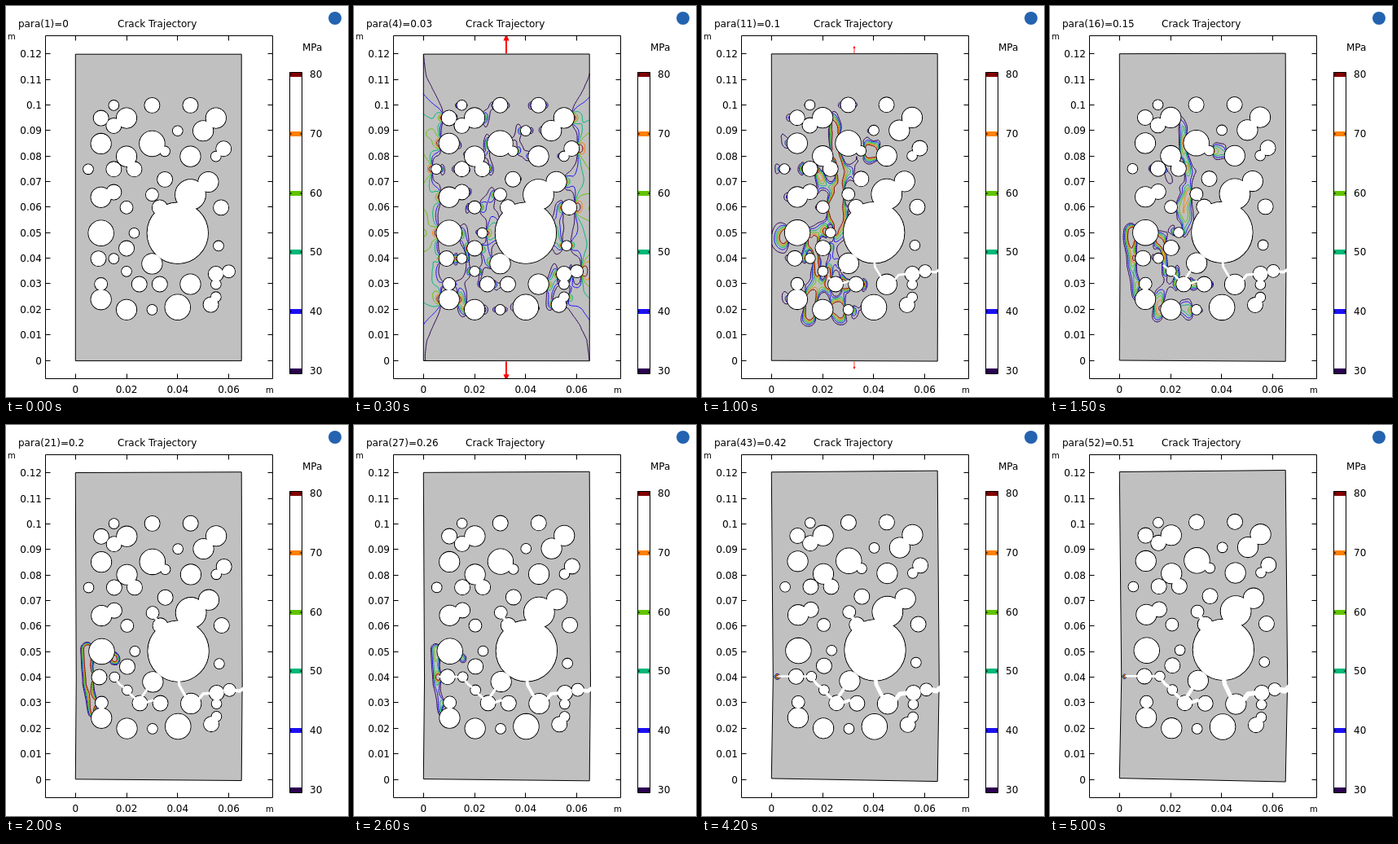
An HTML page that plays this animation: 420x480 px, repeating every 5.1 s.

```html
<!DOCTYPE html>
<html lang="en">
<head>
<meta charset="utf-8">
<title>Crack Trajectory</title>
<style>
html, body { margin: 0; width: 100%; height: 100%; overflow: hidden; background: #fff; }
svg { display: block; width: 420px; height: 480px; }
text { font: 12px "DejaVu Sans", sans-serif; fill: #000; }
.unit { font-size: 10px; }
</style>
</head>
<body>
<svg id="stage" viewBox="0 0 420 480" xmlns="http://www.w3.org/2000/svg"></svg>
<script>
const NS = 'http://www.w3.org/2000/svg';
const stage = document.getElementById('stage');
const STEP_MS = 100, STEPS = 51;
const LEFT = 85.3, RIGHT = 289.2, TOP = 59.2, BOTTOM = 435.6, SCALE = 3.137;
const WIDTH = RIGHT - LEFT, HEIGHT = BOTTOM - TOP;
const levels = [30, 40, 50, 60, 70, 80];
const colors = ['#2c0052', '#1c10f4', '#00b878', '#62c400', '#ff8000', '#840000'];

function add(tag, attrs, parent = stage) {
  const el = document.createElementNS(NS, tag);
  for (const k in attrs) el.setAttribute(k, attrs[k]);
  parent.appendChild(el);
  return el;
}
function label(x, y, str, anchor = 'start', cls = '') {
  const el = add('text', { x, y, 'text-anchor': anchor, class: cls });
  el.textContent = str;
  return el;
}
const clamp = (v, a, b) => Math.min(b, Math.max(a, v));
const ramp = (v, a, b) => clamp((v - a) / (b - a), 0, 1);
const points = str => str.split(' ').map(s => s.split(',').map(Number));

// Hole centres in mm, grouped by radius.
const pores = {
  2: '15,100 40,90 55,80 35,82 5,75 23,50 15,40 20,35 55,30 55,25 30,20 56,45',
  2.5: '30,65 20,60 60,35 10,30',
  3: '10,95 15,92 30,100 45,100 58,83 15,75 23,75 35,71 33,60 57,60 15,66 20,44 9,40 25,30 33,30 55,34 53,22',
  4: '20,95 50,90 55,95 45,80 10,85 20,80 52,70 10,64 30,38 45,30 20,20 10,24',
  5: '30,85 10,50 40,21',
  6: '45,65',
  12: '40,50'
};
const holes = Object.keys(pores).flatMap(r => points(pores[r]).map(([x, y]) =>
  ({ x: LEFT + x * SCALE, y: BOTTOM - y * SCALE, r: r * SCALE })));

// Both halves turn as rigid bodies about the crack line.
const crackY = x => 310 + 17 * ramp(x, 132, 160);
function warp(x, y, open, upper = clamp((crackY(x) - y) / 13 + .5, 0, 1)) {
  const u = (x - LEFT) / WIDTH, lower = 1 - upper;
  const dx = upper * 2.4 * (y - TOP) / 250 + lower * 2.5 * (BOTTOM - y) / 125;
  const dy = upper * (-1.7 - 2 * u) + lower * (-2 + 4.4 * u);
  return [x + open * dx, y + open * dy];
}

// Stress field on a regular grid.
const CELL = 1.5;
const cols = Math.floor(WIDTH / CELL) + 1, rows = Math.floor(HEIGHT / CELL) + 1;
const gx = i => LEFT + i * WIDTH / (cols - 1);
const gy = j => TOP + j * HEIGHT / (rows - 1);

// Kirsch solution for vertical tension, multiplied over all holes.
function concentration(x, y) {
  let k = 1;
  for (const h of holes) {
    const dx = x - h.x, dy = y - h.y, d = dx * dx + dy * dy + 1e-6;
    const q = Math.min(1, h.r * h.r / d);
    if (q < .004) continue;
    const c2 = 2 * dy * dy / d - 1, c4 = 2 * c2 * c2 - 1;
    k *= clamp(1 - q * (1.5 * c2 + c4) + 1.5 * q * q * c4, .02, 3);
  }
  return k;
}

// Bell-shaped ridge along polylines.
function ridge(chains, size, x, y) {
  let best = Infinity;
  for (const pts of chains) {
    for (let i = 1; i < pts.length; i++) {
      const [ax, ay] = pts[i - 1], bx = pts[i][0] - ax, by = pts[i][1] - ay;
      const t = clamp(((x - ax) * bx + (y - ay) * by) / (bx * bx + by * by), 0, 1);
      best = Math.min(best, (x - ax - t * bx) ** 2 + (y - ay - t * by) ** 2);
    }
  }
  return Math.exp(-best / (2 * size * size));
}
const ligament = [
  '164,152 172,205 163,260 138,298 150,335 130,380',
  '172,205 214,174', '166,224 130,200', '150,335 196,341', '105,285 138,298', '150,335 174,378'
].map(points);
const remnant = ['100,276 102,318 109,352', '101,292 130,288'].map(points);

const bulk = [], middle = [], late = [];
for (let j = 0; j < rows; j++) {
  for (let i = 0; i < cols; i++) {
    const x = gx(i), y = gy(j), k = concentration(x, y);
    const u2 = ((x - LEFT) / WIDTH * 2 - 1) ** 2;
    const inner = ramp(Math.min(j, rows - j) / rows, .07, .2);
    const soft = clamp(k, .35, 1.6);
    bulk.push((12 + 50 * u2 + 34 * inner * (1 - .5 * u2)) * k);
    middle.push(72 * ridge(ligament, 8, x, y) * soft + 17 * (1 - ramp(x, 190, 245)) * k);
    late.push(86 * ridge(remnant, 5.2, x, y) * soft);
  }
}

function field(p) {
  const a = Math.min(p / .06, 1) * (1 - ramp(p, .06, .1));
  const b = ramp(p, .06, .1) * (1 - ramp(p, .1, .2));
  const c = ramp(p, .1, .2) * (1 - ramp(p, .2, .32));
  const peak = 130 * ramp(p, .22, .33), size = 2.5 - ramp(p, .33, .51);
  const tip = tipX(p) - 1;
  return bulk.map((v, n) => {
    let s = a * v + b * middle[n] + c * late[n];
    const dx = gx(n % cols) - tip, dy = gy(Math.floor(n / cols)) - 310.5;
    if (peak && Math.abs(dx) < 9 && Math.abs(dy) < 9) {
      s += peak * Math.exp(-(dx * dx + dy * dy) / (2 * size * size));
    }
    return s;
  });
}
const tipX = p => 106 - 13 * ramp(p, .24, .33) - 3 * ramp(p, .33, .51);

// Marching squares; one path string per level.
function contours(f, open) {
  const out = levels.map(() => '');
  for (let j = 0; j < rows - 1; j++) {
    for (let i = 0; i < cols - 1; i++) {
      const n = j * cols + i;
      const v = [f[n], f[n + 1], f[n + cols + 1], f[n + cols]];
      const hi = Math.max(...v), lo = Math.min(...v);
      if (hi < levels[0] || lo >= 80) continue;
      const x = [gx(i), gx(i + 1), gx(i + 1), gx(i)];
      const y = [gy(j), gy(j), gy(j + 1), gy(j + 1)];
      levels.forEach((lv, m) => {
        if (lo >= lv || hi < lv) return;
        const pts = [];
        for (let e = 0; e < 4; e++) {
          const g = (e + 1) % 4;
          if ((v[e] >= lv) === (v[g] >= lv)) continue;
          const t = (lv - v[e]) / (v[g] - v[e]);
          const q = warp(x[e] + t * (x[g] - x[e]), y[e] + t * (y[g] - y[e]), open);
          pts.push(q.map(c => c.toFixed(1)).join(' '));
        }
        for (let e = 0; e + 1 < pts.length; e += 2) out[m] += 'M' + pts[e] + 'L' + pts[e + 1];
      });
    }
  }
  return out;
}

// Moving parts.
const clip = add('clipPath', { id: 'plot' }, add('defs', {}));
add('rect', { x: 49, y: 37, width: 278, height: 420 }, clip);
const plot = add('g', { 'clip-path': 'url(#plot)' });
const block = add('path', { fill: '#c0c0c0' }, plot);
const lines = colors.map(c => add('path', { fill: 'none', stroke: c }, plot));
const edge = add('path', { fill: 'none', stroke: '#000' }, plot);
const rims = holes.map(h => add('circle', { r: h.r, fill: '#fff', stroke: '#000', 'stroke-width': 1.1 }, plot));
const voids = holes.map(h => add('circle', { r: h.r - .5, fill: '#fff' }, plot));

// Crack branches: start, end, points.
const cracks = [
  [.07, .09, '211,313 212,321 221,335'],
  [.07, .09, '236,336 241,330 252,329'],
  [.05, .08, '279,326 286,327 293,323'],
  [.08, .12, '161,339 149,328'],
  [.08, .11, '171,341 179,338 185,340'],
  [.09, .13, '173,324 166,334'],
  [.12, .17, '146,324 139,319 134,313'],
  [.12, .2, '182,237 186,242'],
  [.21, .26, '129,310 119,310']
].map(([from, to, str]) => ({ from, to, pts: points(str), el: crackPath() }));
const lastCrack = crackPath();
function crackPath() {
  return add('path', { fill: 'none', stroke: '#fff', pathLength: 1, 'stroke-linejoin': 'round' }, plot);
}
const arrows = add('path', { fill: '#f00' }, plot);

function arrow(y, dir, len) {
  const w = Math.min(3.8, len * .085) / 2, head = len * .35, tip = y + dir * len, neck = tip - dir * head;
  return `M${187 - w} ${y}V${neck}H${187 - w * 3.5}L187 ${tip}L${187 + w * 3.5} ${neck}H${187 + w}V${y}Z`;
}

// Axes, title and legend.
let ticks = 'M48.5 36.5H327.5V457.5H48.5Z';
for (let i = 0; i <= 12; i++) {
  const y = Math.round(BOTTOM - i * 10 * SCALE);
  ticks += `M48.5 ${y - .5}h6M327.5 ${y - .5}h-6`;
  label(44, y + 4, String(i / 100), 'end');
}
for (let i = 0; i <= 3; i++) {
  const x = LEFT + i * 20 * SCALE, px = Math.floor(x) + .5;
  ticks += `M${px} 457.5v-6M${px} 36.5v6`;
  label(x, 475, String(i * 2 / 100), 'middle');
}
add('path', { d: ticks, fill: 'none', stroke: '#000' });
const para = label(15, 25.5, '');
label(137, 25.5, 'Crack Trajectory');
label(2, 41, 'm', 'start', 'unit');
label(319, 475, 'm', 'start', 'unit');
label(364, 55, 'MPa');
let marks = 'M348.5 81.5H363.5V451.5H348.5Z';
levels.forEach((lv, i) => {
  const y = Math.round(448 - i * 72.8);
  add('rect', { x: 348, y: y - 3, width: 16, height: 6, fill: colors[i] });
  marks += `M348 ${y}h3M364 ${y}h-3`;
  label(373, y + 4, String(lv));
});
add('path', { d: marks, fill: 'none', stroke: '#000' });
add('circle', { cx: 404, cy: 15, r: 8, fill: '#2463b0' });

function draw(step) {
  const n = step < 50 ? step : 51;
  const p = n / 100, open = p / .51;
  para.textContent = `para(${n + 1})=${p}`;

  const at = (x, y, side) => warp(x, y, open, side).join(' ');
  const upper = [[RIGHT, 325], [RIGHT, TOP], [LEFT, TOP], [LEFT, 310]].map(([x, y]) => at(x, y, 1));
  const lower = [[LEFT, 310], [LEFT, BOTTOM], [RIGHT, BOTTOM], [RIGHT, 325]].map(([x, y]) => at(x, y, 0));
  const outline = 'M' + [...upper, ...lower].join('L');
  block.setAttribute('d', outline);
  edge.setAttribute('d', outline + (p < .08 ? 'Z' : ''));

  contours(field(p), open).forEach((d, i) => lines[i].setAttribute('d', d));
  holes.forEach((h, i) => {
    const [x, y] = warp(h.x, h.y, open);
    for (const el of [rims[i], voids[i]]) {
      el.setAttribute('cx', x);
      el.setAttribute('cy', y);
    }
  });

  const trace = (el, pts) => {
    el.setAttribute('d', 'M' + pts.map(([x, y]) => at(x, y)).join('L'));
    el.setAttribute('stroke-width', 2 + open * 5.2 * (pts[0][0] - LEFT) / WIDTH);
  };
  for (const c of cracks) {
    const grown = ramp(p, c.from, c.to);
    c.el.style.display = grown > 0 ? '' : 'none';
    c.el.setAttribute('stroke-dasharray', `${grown} 2`);
    trace(c.el, c.pts);
  }
  trace(lastCrack, [[106, 310], [tipX(p), 310]]);

  const force = 800 * Math.min(p, .06) * Math.exp(-Math.max(0, p - .06) / .025);
  arrows.setAttribute('d', force > 1.5 ? arrow(TOP - 1, -1, force) + arrow(BOTTOM + 1, 1, force) : '');
}

const start = performance.now();
let shown = -1;
function tick() {
  const step = Math.floor((performance.now() - start) / STEP_MS) % STEPS;
  if (step !== shown) draw(shown = step);
  requestAnimationFrame(tick);
}
tick();
</script>
</body>
</html>
```
